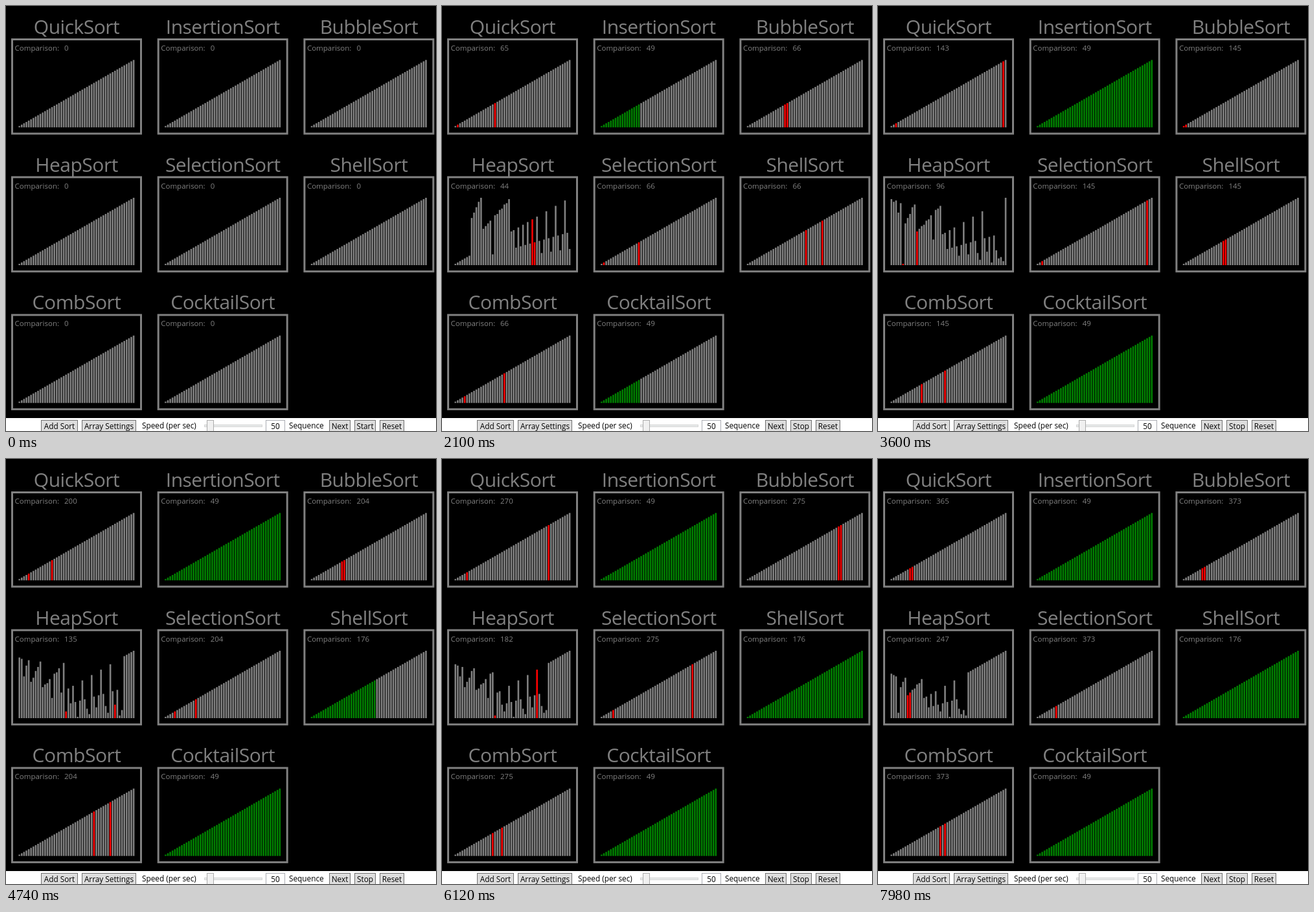
An HTML page that plays this animation: 664x656 px, repeating every 8000 ms.

```html
<!DOCTYPE html>
<html lang="en">
<head>
<meta charset="utf-8">
<title>Sorting on a sorted array</title>
<style>
  html, body { margin: 0; width: 100%; height: 100%; overflow: hidden; background: #000; }
  svg { display: block; width: 664px; height: 656px; }
  text { font-family: "Open Sans", "Noto Sans", sans-serif; }
  .title { font-size: 30px; letter-spacing: -.5px; fill: #808080; text-anchor: middle; }
  .info { font-size: 11.5px; fill: #808080; }
  .ui { font-size: 11.8px; fill: #000; }
  .mid { text-anchor: middle; }
</style>
</head>
<body>
<svg id="stage" viewBox="0 0 664 656"></svg>
<script>
const SIZE = 50, LOOP = 8000, FRAME = 60;
const GRAY = '#808080', RED = '#ff0000', GREEN = '#008000', LIGHT = '#90ee90';
const PITCH = 3.6, UNIT = 2.08;
const stage = document.getElementById('stage');

function add(tag, attrs, text) {
  const el = document.createElementNS('http://www.w3.org/2000/svg', tag);
  for (const k in attrs) el.setAttribute(k, attrs[k]);
  if (text !== undefined) el.textContent = text;
  return stage.appendChild(el);
}

// Runs a sort on 1..SIZE and records each comparison and swap as one step.
function record(sort) {
  const a = Array.from({ length: SIZE }, (_, i) => i + 1);
  const steps = [{ i: -1, j: -1, count: 0, a: a.slice() }];
  let count = 0;
  const push = (i, j, color) => steps.push({ i, j, color, count, a: a.slice() });
  const flip = (i, j) => { [a[i], a[j]] = [a[j], a[i]]; };
  const less = (i, j) => { count++; push(i, j, RED); return a[i] < a[j]; };
  const swap = (i, j) => { flip(i, j); push(i, j, LIGHT); };
  sort(less, swap, flip);
  return steps;
}

function gapInsertion(less, swap, gap) {
  for (let r = 0; r < gap; r++)
    for (let i = r + gap; i < SIZE; i += gap)
      for (let j = i; j >= gap && less(j, j - gap); j -= gap) swap(j, j - gap);
}

const sorts = {
  QuickSort(less, swap) {
    (function part(lo, hi) {
      if (lo >= hi) return;
      let p = lo;
      for (let j = lo + 1; j <= hi; j++) if (less(j, lo)) swap(++p, j);
      swap(lo, p);
      part(lo, p - 1);
      part(p + 1, hi);
    })(0, SIZE - 1);
  },
  InsertionSort(less, swap) {
    gapInsertion(less, swap, 1);
  },
  BubbleSort(less, swap) {
    for (let end = SIZE - 1; end > 0; end--)
      for (let j = 0; j < end; j++) if (less(j + 1, j)) swap(j, j + 1);
  },
  HeapSort(less, swap, flip) {
    const sift = (i, n) => {
      for (;;) {
        const l = 2 * i + 1;
        let top = i;
        if (l < n && less(top, l)) top = l;
        if (l + 1 < n && less(top, l + 1)) top = l + 1;
        if (top === i) return;
        swap(i, top);
        i = top;
      }
    };
    for (let i = SIZE / 2 - 1; i >= 0; i--) sift(i, SIZE);
    for (let end = SIZE - 1; end > 0; end--) { flip(0, end); sift(0, end); }
  },
  SelectionSort(less, swap) {
    for (let i = 0; i < SIZE - 1; i++) {
      let min = i;
      for (let j = i; j < SIZE; j++) if (less(j, min)) min = j;
      if (min !== i) swap(i, min);
    }
  },
  ShellSort(less, swap) {
    for (const gap of [13, 7, 3, 1]) gapInsertion(less, swap, gap);
  },
  CombSort(less, swap) {
    for (let g = SIZE / 1.3; g >= 1; g /= 1.3) {
      const gap = Math.floor(g);
      for (let i = 0; i + gap < SIZE; i++) if (less(i + gap, i)) swap(i, i + gap);
    }
  },
  CocktailSort(less, swap) {
    let lo = 0, hi = SIZE - 1, moved = true;
    while (moved) {
      moved = false;
      for (let j = lo; j < hi; j++) if (less(j + 1, j)) { swap(j, j + 1); moved = true; }
      if (!moved) break;
      hi--;
      for (let j = hi; j > lo; j--) if (less(j, j - 1)) { swap(j, j - 1); moved = true; }
      lo++;
    }
  }
};

add('rect', { width: 664, height: 656, fill: '#000' });

const panels = Object.entries(sorts).map(([name, sort], k) => {
  const x = 8 + (k % 3) * 225.7, y = 50 + Math.floor(k / 3) * 212.7;
  add('text', { class: 'title', x: x + 101, y: y - 7 }, name);
  add('rect', { x: x + 1.5, y: y + 1.5, width: 199, height: 145.5,
    fill: 'none', stroke: GRAY, 'stroke-width': 3 });
  add('text', { class: 'info', x: x + 5.5, y: y + 19 }, 'Comparison:');
  const label = add('text', { class: 'info', x: x + 82, y: y + 19 });
  const bars = Array.from({ length: SIZE }, (_, i) =>
    add('rect', { x: x + 11.4 + i * PITCH, width: 2.6 }));
  return { steps: record(sort), label, bars, base: y + 137.3 };
});

function drawPanel({ steps, label, bars, base }, n) {
  const last = steps.length - 1, s = steps[Math.min(n, last)];
  label.textContent = s.count;
  bars.forEach((bar, i) => {
    const h = s.a[i] * UNIT;
    let color = GRAY;
    if (n > last) { if (i < n - last) color = GREEN; }
    else if (i === s.i || i === s.j) color = s.color;
    bar.setAttribute('y', base - h);
    bar.setAttribute('height', h);
    bar.setAttribute('fill', color);
  });
}

// Toolbar
function button(x, w, text) {
  const box = add('rect', { x: x + .5, y: 639.5, width: w - 1, height: 20,
    fill: '#dddddd', stroke: '#707070' });
  return { box, label: add('text', { class: 'ui mid', x: x + w / 2, y: 653 }, text) };
}
add('rect', { y: 636, width: 664, height: 20, fill: '#fff' });
button(54, 57, 'Add Sort');
button(117, 84, 'Array Settings');
add('text', { class: 'ui', x: 210, y: 652 }, 'Speed (per sec)');
add('rect', { x: 306.5, y: 646.5, width: 89, height: 3, fill: '#e7eaea', stroke: '#d6d6d6' });
add('rect', { x: 310.5, y: 639.5, width: 10, height: 17, fill: '#f0f0f0', stroke: '#acacac' });
add('rect', { x: 401.5, y: 639.5, width: 29, height: 20, fill: '#fff', stroke: '#abadb3' });
add('text', { class: 'ui mid', x: 416, y: 653 }, '50');
add('text', { class: 'ui', x: 437, y: 652 }, 'Sequence');
button(499, 33, 'Next');
const run = button(538, 33, 'Start');
button(577, 38, 'Reset');
const pointer = add('path', { d: 'M.5 .5V16L4 12.7L6.5 18L9 17L6.6 11.7H11.5Z',
  fill: '#fff', stroke: '#000' });

// Time in ms and steps done by then
const pace = [[820, 0], [1440, 32], [2100, 66], [3600, 145], [4740, 204], [6120, 275], [7980, 373]];

function stepAt(t) {
  if (t <= pace[0][0]) return 0;
  const k = Math.max(1, pace.findIndex(p => t <= p[0]));
  const [t0, n0] = pace[k - 1], [t1, n1] = pace[k];
  return Math.round(n0 + (n1 - n0) * (t - t0) / (t1 - t0));
}

function draw(ms) {
  const t = Math.floor((ms % LOOP) / FRAME) * FRAME;
  const n = stepAt(t);
  panels.forEach(p => drawPanel(p, n));

  const p = Math.min(1, Math.max(0, (t - 60) / 540)), e = 1 - (1 - p) ** 2;
  const px = 628 - 76 * e, py = 364 + 282 * e;
  const shown = t >= 60 && t < 840, hover = shown && py > 639;
  pointer.setAttribute('visibility', shown ? 'visible' : 'hidden');
  pointer.setAttribute('transform', `translate(${px} ${py})`);
  run.box.setAttribute('fill', hover ? '#bee6fd' : '#dddddd');
  run.box.setAttribute('stroke', hover ? '#3c7fb1' : '#707070');
  run.label.textContent = t < 780 ? 'Start' : 'Stop';
}

const begin = performance.now();
function tick() {
  draw(performance.now() - begin);
  requestAnimationFrame(tick);
}
tick();
</script>
</body>
</html>
```
